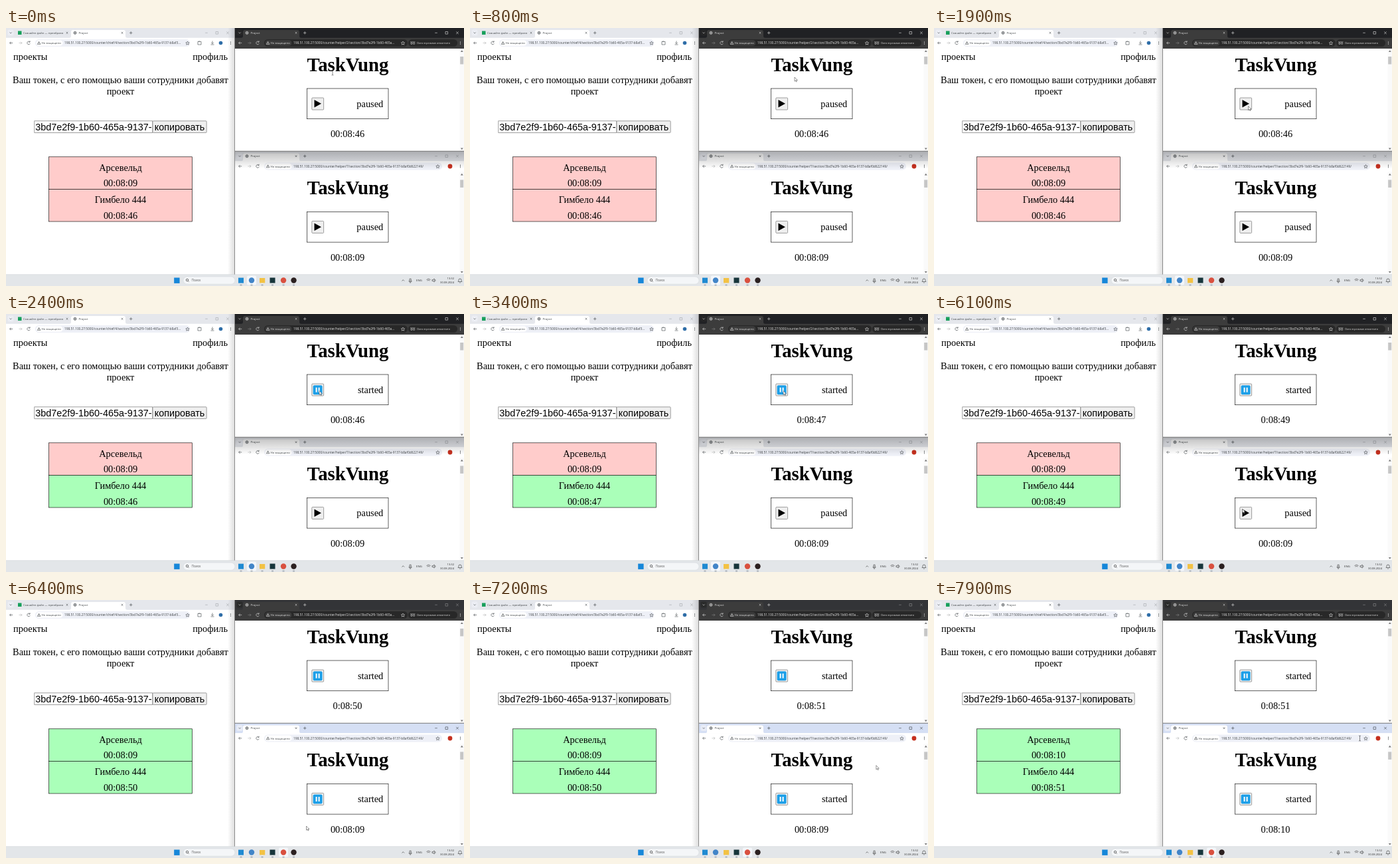
An HTML page that plays this animation: 690 by 388 pixels, repeating every 8 s.

```html
<!DOCTYPE html>
<html lang="ru">
<head>
<meta charset="utf-8">
<title>Учёт времени</title>
<style>
  html, body { margin: 0; width: 100%; height: 100%; overflow: hidden; background: #fff; }
  svg { display: block; width: 100vw; height: 100vh; }
  text { white-space: pre; }
  .page { font: 14.4px "Liberation Serif", serif; fill: #000; }
  .title { font: bold 28.8px "Liberation Serif", serif; }
  .form { font: 14.4px "Liberation Sans", sans-serif; }
  .ui { font: 4.3px "Open Sans", sans-serif; }
  .url { font-size: 4.77px; }
  .mid { text-anchor: middle; }
  .end { text-anchor: end; }
  .line { fill: none; stroke: currentColor; stroke-width: .6; }
  .frame { stroke: #000; stroke-width: .62; }
  .field { stroke: #808080; stroke-width: .75; }
</style>
</head>
<body>
<svg id="stage" viewBox="0 0 690 388" xmlns="http://www.w3.org/2000/svg"></svg>
<script>
const LOOP = 8000, STEP = 100;
const LOWER = 185.4; // top of the lower right window
const HOST = '198.51.100.27:5000/counter/';
const TOKEN = '3bd7e2f9-1b60-465a-9137-';

const rect = (x, y, w, h, fill, extra = '') =>
  `<rect x="${x}" y="${y}" width="${w}" height="${h}" fill="${fill}" ${extra}/>`;
const dot = (x, y, r, fill, extra = '') => `<circle cx="${x}" cy="${y}" r="${r}" fill="${fill}" ${extra}/>`;
const text = (x, y, cls, str, extra = '') => `<text x="${x}" y="${y}" class="${cls}" ${extra}>${str}</text>`;
const line = (d, extra = '') => `<path class="line" d="${d}" ${extra}/>`;

const globe = (x, y) => dot(x, y, 2.1, 'none', 'stroke="currentColor" stroke-width=".6"') +
  line(`M${x - 2} ${y}h4M${x} ${y - 2}v4`, 'stroke-width=".4"');
const cross = (x, y, s) => line(`M${x - s} ${y - s}l${2 * s} ${2 * s}m0 ${-2 * s}l${-2 * s} ${2 * s}`);
const star = (x, y) => line(`M${x} ${y - 2.6}l.8 1.7 1.9 .2-1.4 1.3 .4 1.9-1.7-1-1.7 1 .4-1.9-1.4-1.3 1.9-.2z`);

// Tab strip and toolbar; tabX is the left edge of the active tab.
function chrome({ id, x, y, w, tabX, tabW, strip, bar, pill, ink, soft, url, urlW, controls }) {
  const cy = y + 7.3, by = y + 22.5, right = x + w;
  return `<g color="${ink}" fill="${ink}">` +
    rect(x, y, w, 15, strip, `id="${id}Strip"`) +
    rect(x + 2.5, y + 2.5, 9, 9, pill, 'rx="2.5" opacity=".75"') +
    line(`M${x + 5.5} ${cy - .8}l1.6 1.6 1.6-1.6`) +
    `<path d="M${tabX - 3} ${y + 15}q3 0 3-3v-6q0-3 3-3h${tabW - 6}q3 0 3 3v6q0 3 3 3z" fill="${bar}"/>` +
    globe(tabX + 6, cy) + text(tabX + 11.5, cy + 1.6, 'ui', 'Project') +
    cross(tabX + tabW - 5, cy, 1.3) +
    line(`M${tabX + tabW + 6} ${cy}h4.4m-2.2-2.2v4.4`) +
    `<g id="${id}Controls" opacity=".4">` +
    line(`M${controls - 1.8} ${cy}h3.6M${controls + 14} ${cy - 1.8}h3.6v3.6h-3.6z`) +
    cross(controls + 32, cy, 1.8) + '</g>' +
    rect(x, y + 14.8, w, 16.2, bar) +
    line(`M${x + 10.2} ${by}h-4.6l2-2m-2 2l2 2`) +
    line(`M${x + 19.4} ${by}h4.6l-2-2m2 2l-2 2`, 'opacity=".4"') +
    line(`M${x + 36} ${by - 1.4}a2.3 2.3 0 1 0 .3 2.2m-.2-4v1.9h-1.9`) +
    rect(x + 44, y + 17, urlW, 11, pill, 'rx="5.5"') +
    rect(x + 45.5, y + 18.2, 40, 8.6, soft, 'rx="4.3"') +
    line(`M${x + 47.3} ${by + 1.9}l2.3-4 2.3 4zM${x + 49.6} ${by - .6}v1.2`) +
    text(x + 53.5, by + 1.6, 'ui', 'Не защищено') +
    text(x + 88, by + 1.7, 'ui url', url) +
    [-1.8, 0, 1.8].map(d => dot(right - 5.5, by + d, .55, ink)).join('') + '</g>';
}

function worker(id, y) {
  return `<g transform="translate(0 ${y})">` + rect(345, 30.5, 345, 155, '#fff') +
    text(515, 65, 'title mid', 'TaskVung') +
    rect(453.5, 91, 122.5, 45.7, 'none', 'class="frame"') +
    rect(460.8, 105, 17.8, 18, '#efefef', 'class="field" rx="1"') +
    `<path id="${id}Play" d="M464.5 108l10.5 5.8-10.5 5.8z"/>` +
    `<g id="${id}Pause">` + rect(462.6, 107.2, 14, 14, '#1c9fe8', 'rx="2"') +
    rect(466.6, 110.6, 2, 7, '#fff') + rect(470.6, 110.6, 2, 7, '#fff') + '</g>' +
    text(568.3, 118.8, 'page end', '', `id="${id}State"`) +
    text(514.5, 164.4, 'page mid', '', `id="${id}Time"`) +
    rect(683.5, 30.5, 6.5, 155, '#fafafa') + rect(684.2, 43, 5, 11.5, '#c6c6c6') +
    '<path d="M684.8 36l2-2.6 2 2.6zM684.8 180.5l2 2.6 2-2.6z" fill="#777"/></g>';
}

function member(id, y, name) {
  return rect(64.5, y, 216, 48.6, '#ffcccb', `id="${id}Card" class="frame"`) +
    text(172.5, y + 20.9, 'page mid', name) +
    text(172.5, y + 44.5, 'page mid', '', `id="${id}Total"`);
}

const light = { bar: '#fff', pill: '#eef0f7', ink: '#3c4043', soft: '#fff', strip: '#e5e7ec' };

const owner = rect(0, 0, 345, 371, '#fff') +
  chrome({ ...light, id: 'o', x: 0, y: 0, w: 344, tabX: 98, tabW: 82, controls: 302, urlW: 233,
    url: HOST + 'chief/4/section/' + TOKEN + 'b8af3…' }) +
  rect(18, 4.5, 5.5, 5.5, '#18a05c') + text(26, 8.9, 'ui', 'Скачайте файл — преобразо', 'fill="#3c4043"') +
  `<g color="#3c4043">` + cross(92, 7.3, 1.3) + star(273.5, 22.7) +
  line('M289 20.5h5v4.5h-5zM291 19v1.5M308.5 25h5M311 19.5v4m-1.8-1.6l1.8 1.8 1.8-1.8') + '</g>' +
  dot(323.5, 22.5, 2.8, '#2f6ea8') +
  rect(334, 0, 11, 371, 'url(#edge)') +
  text(11, 48.1, 'page', 'проекты') + text(334, 48.1, 'page end', 'профиль') +
  text(172.5, 82.8, 'page mid', 'Ваш токен, с его помощью ваши сотрудники добавят') +
  text(172.5, 100.1, 'page mid', 'проект') +
  rect(42.8, 139.8, 178, 17.6, '#fff', 'class="field"') +
  text(44.3, 153.6, 'form', TOKEN) +
  rect(221, 139.8, 81.2, 17.6, '#efefef', 'class="field" rx="1"') +
  text(261.6, 153.6, 'form mid', 'копировать') +
  member('b', 193.8, 'Арсевельд') + member('a', 242.4, 'Гимбело 444');

const workers = worker('a', 0) +
  chrome({ id: 'a', x: 345, y: 0, w: 345, tabX: 357, tabW: 85, controls: 648, urlW: 216,
    strip: '#202124', bar: '#3c3c3c', pill: '#282828', ink: '#e3e3e3', soft: '#3c3c3c',
    url: HOST + 'helper/2/section/' + TOKEN.slice(0, 18) + '…' }) +
  `<g color="#e3e3e3" fill="#e3e3e3">` + star(598, 22.7) + rect(606, 17, 74, 11, '#282828', 'rx="5.5"') +
  dot(611, 23.3, 1.2, 'none', 'stroke="#e3e3e3" stroke-width=".6"') +
  dot(614.6, 23.3, 1.2, 'none', 'stroke="#e3e3e3" stroke-width=".6"') + line('M609 21h7.5') +
  text(619, 24.1, 'ui', 'Окно в режиме инкогнито', 'style="font-size:3.9px"') + '</g>' +
  worker('b', LOWER) +
  chrome({ ...light, id: 'b', x: 345, y: LOWER, w: 345, tabX: 357, tabW: 85, controls: 648, urlW: 268,
    url: HOST + 'helper/7/section/' + TOKEN + 'b8af0d622149/' }) +
  `<g color="#3c4043">` + star(650.5, 208.2) + '</g>' + dot(669, 208, 3.4, '#c5301f') +
  rect(345, LOWER, 345, 26, 'url(#drop)', 'id="shadow"') +
  rect(345, LOWER - .6, 345, .8, '#555') + rect(344.2, 0, .8, 371, '#777');

const taskbar = rect(0, 370.8, 690, 17.2, '#e3e6e9') + rect(0, 370.6, 690, .5, '#c6cbd0') +
  rect(363, 372.5, 14, 14, '#f3f6fa', 'rx="2" id="taskA"') +
  rect(411, 372.5, 14, 14, '#f3f6fa', 'rx="2" id="taskB"') +
  rect(253.2, 375.5, 8.4, 8.4, '#1687d9') +
  rect(267, 374, 78, 11.2, '#f4f6f8', 'rx="5.6" stroke="#cfd4d9" stroke-width=".5"') +
  dot(273, 379, 1.7, 'none', 'stroke="#333" stroke-width=".7"') +
  `<g color="#333">` + line('M274.2 380.3l1.5 1.5') + '</g>' +
  text(279.5, 381.3, 'ui', 'Поиск', 'fill="#555" style="font-size:4.7px"') +
  rect(350, 375.6, 8, 8, '#1f8ad2') + dot(370, 379.5, 4.2, '#4285c8') +
  rect(382, 376, 8.2, 7.4, '#f3c244') + rect(397.5, 375.5, 8, 8, '#17353b') +
  dot(418, 379.5, 4.2, '#d9503f') + dot(433.5, 379.5, 4.2, '#2b2020') +
  [354, 370, 386, 401.5, 418, 433.5].map(x => rect(x - 1.5, 386, 3, .9, '#7b848d')).join('') +
  `<g color="#333" fill="#333">` +
  line('M596.5 380.5l1.8-1.8 1.8 1.8M608 377.2h2.2v3.6H608zM607 380q0 2.2 2.1 2.2t2.1-2.2M609.1 382.2v1.6') +
  text(618, 381.1, 'ui', 'ENG') +
  line('M633.5 378.5q3-2.6 6 0M634.6 380q1.9-1.5 3.8 0M642 378.5h1.4l1.8-1.5v5l-1.8-1.5H642zM646.4 378q1.2 1.5 0 3') +
  text(675, 378.3, 'ui end', '13:32', 'style="font-size:4.1px"') +
  text(675, 384.3, 'ui end', '30.08.2024', 'style="font-size:4.1px"') +
  line('M681 381.5q1-.8 1-2.5a2 2 0 0 1 4 0q0 1.7 1 2.5zM683.2 383h1.6') + '</g>';

const cursors =
  '<path id="arrow" d="M0 0v6.2l1.5-1.4 1 2.2 .9-.4-.9-2.1h1.9z" fill="#fff" stroke="#333" stroke-width=".5"/>' +
  '<path id="beam" d="M-1.4-4q1.4 0 1.4 .8v6.4q0 .8-1.4 .8M1.4-4q-1.4 0-1.4 .8M0 3.2q0 .8 1.4 .8" fill="none" stroke="#333" stroke-width=".6"/>';

const fade = (id, dir, from, to) => `<linearGradient id="${id}" ${dir}>` +
  `<stop stop-opacity="${from}"/><stop offset="1" stop-opacity="${to}"/></linearGradient>`;

document.getElementById('stage').innerHTML =
  '<defs>' + fade('edge', '', 0, .14) + fade('drop', 'x2="0" y2="1"', .25, 0) + '</defs>' +
  owner + workers + taskbar + cursors;

const el = id => document.getElementById(id);
const show = (id, on) => el(id).setAttribute('visibility', on ? 'visible' : 'hidden');
const paint = (id, color) => el(id).setAttribute('fill', color);

// Pointer stops: time, x, y
const path = [
  [0, 492, 67], [800, 489, 74], [1800, 473.5, 117.5], [1900, 473.5, 117.5], [2200, 472, 115.5],
  [3500, 472, 115.5], [3600, 471.5, 116], [4900, 471.5, 116], [5700, 465, 290], [5900, 464.5, 293],
  [6200, 464.5, 293], [6400, 452.5, 340], [6700, 454, 341], [7500, 685, 206],
  [7700, 685, 206], [7900, 641.5, 208]
];
const ease = p => p * p * (3 - 2 * p);

function pointer(t) {
  const i = path.findIndex(stop => stop[0] > t);
  if (i < 0) return path[path.length - 1].slice(1);
  const [t0, x0, y0] = path[i - 1], [t1, x1, y1] = path[i];
  const p = ease((t - t0) / (t1 - t0));
  return [x0 + (x1 - x0) * p, y0 + (y1 - y0) * p];
}

const ticks = (t, times) => times.filter(at => t >= at).length;
const clock = s => `00:08:${String(s).padStart(2, '0')}`;

function drawWorker(id, on, base, count) {
  show(id + 'Play', !on);
  show(id + 'Pause', on);
  el(id + 'State').textContent = on ? 'started' : 'paused';
  el(id + 'Time').textContent = clock(base + count).slice(count ? 1 : 0);
}

function drawMember(id, on, seconds) {
  paint(id + 'Card', on ? '#aaffb9' : '#ffcccb');
  el(id + 'Total').textContent = clock(seconds);
}

function draw(t) {
  drawWorker('a', t >= 2200, 46, ticks(t, [3300, 4200, 5300, 6200, 7200]));
  drawWorker('b', t >= 6200, 9, ticks(t, [7300]));
  drawMember('a', t >= 2300, 46 + ticks(t, [3400, 4400, 5400, 6400, 7400]));
  drawMember('b', t >= 6300, 9 + ticks(t, [7400]));

  const lower = t >= 6200;
  paint('aStrip', lower ? '#333437' : '#202124');
  paint('bStrip', lower ? '#d5dff4' : light.strip);
  el('aControls').setAttribute('opacity', lower ? .5 : 1);
  el('bControls').setAttribute('opacity', lower ? 1 : .4);
  show('shadow', !lower);
  show('taskA', !lower);
  show('taskB', lower);

  const [x, y] = pointer(t), typing = t < 800 || t >= 7800;
  show('beam', typing);
  show('arrow', !typing);
  el(typing ? 'beam' : 'arrow').setAttribute('transform', `translate(${x} ${y})`);
}

const start = performance.now();
function tick() {
  const t = (performance.now() - start) % LOOP;
  draw(Math.floor(t / STEP) * STEP);
  requestAnimationFrame(tick);
}
tick();
</script>
</body>
</html>
```
